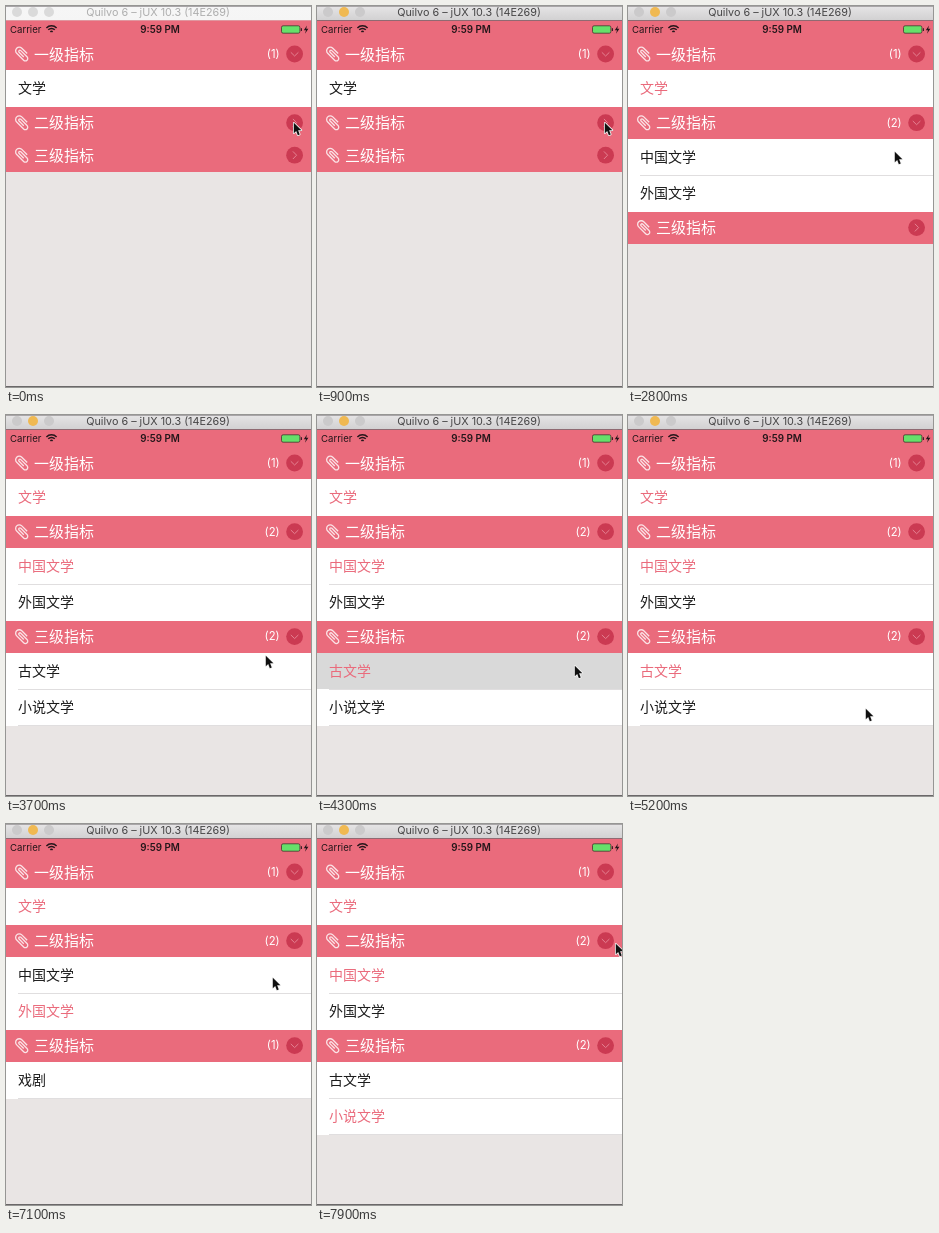
An HTML page with a canvas that plays this animation: 305x381 px, repeating every 8 s.

```html
<!DOCTYPE html>
<html lang="zh">
<head>
<meta charset="utf-8">
<style>
  html, body { margin: 0; width: 100%; height: 100%; overflow: hidden; background: #e9e5e4; }
  canvas { display: block; width: 305px; height: 381px; }
</style>
</head>
<body>
<canvas id="stage"></canvas>
<script>
const W = 305, H = 381, LOOP = 8000, STEP = 100;
const PINK = '#ea6b7c', DARK = '#cb3a52', GREY = '#e9e5e4', INK = '#24161a';
const LATIN = 'Inter, "Liberation Sans", sans-serif';
const HAN = '"Noto Sans CJK SC", "Noto Sans CJK", sans-serif';
const TOP = 32, HEAD_H = 32.5, ROW_H = 36.2;
const CLICK_DELAY = 200, PRESS_FADE = 300;

const canvas = document.getElementById('stage');
const ctx = canvas.getContext('2d');
const dpr = window.devicePixelRatio || 1;
canvas.width = W * dpr;
canvas.height = H * dpr;

const node = (name, ...kids) => ({ name, kids });
const titles = ['一级指标', '二级指标', '三级指标'];
const root = node('',
  node('文学',
    node('中国文学', node('古文学'), node('小说文学')),
    node('外国文学', node('戏剧'))));

// Pointer arrivals; a stop with a level clicks that row shortly after.
const stop = (at, x, y, level, index) => ({ at, x, y, level, index });
const stops = [
  stop(0, 287, 116),
  stop(1200, 283, 137),
  stop(2000, 282, 73, 0, 0),
  stop(2800, 266, 145, 1, 0),
  stop(3700, 259, 240),
  stop(4100, 257, 250, 2, 0),
  stop(5200, 237, 293, 2, 1),
  stop(6100, 253, 178, 1, 1),
  stop(7100, 266, 153, 1, 0),
  stop(7900, 298, 119)
];

function rect(x, y, w, h, color) {
  ctx.fillStyle = color;
  ctx.fillRect(x, y, w, h);
}

function disc(x, y, r, color) {
  ctx.fillStyle = color;
  ctx.beginPath();
  ctx.arc(x, y, r, 0, 7);
  ctx.fill();
}

function text(s, x, y, font, color, align = 'left') {
  ctx.font = font;
  ctx.fillStyle = color;
  ctx.textAlign = align;
  ctx.fillText(s, x, y);
}

function stroke(color, width) {
  ctx.strokeStyle = color;
  ctx.lineWidth = width;
  ctx.stroke();
}

function fill(color) {
  ctx.fillStyle = color;
  ctx.fill();
}

function poly(...points) {
  ctx.beginPath();
  points.forEach(([x, y]) => ctx.lineTo(x, y));
}

function titleBar(active) {
  const g = ctx.createLinearGradient(0, 0, 0, 14);
  g.addColorStop(0, active ? '#e6e5e6' : '#f6f6f6');
  g.addColorStop(1, active ? '#d2d1d2' : '#f5f5f5');
  rect(0, 0, W, 14, g);
  rect(0, 0, W, 1, '#a9a6a8');
  rect(0, 14, W, 1, active ? '#8f6a72' : '#e0969f');
  for (let i = 0; i < 3; i++) {
    const lit = active && i === 1;
    disc(11 + 16 * i, 6, 5, lit ? '#f0b952' : active ? '#cbcacb' : '#dadada');
  }
  text('Quilvo 6 – jUX 10.3 (14E269)', 152, 10, '10.8px ' + LATIN,
    active ? '#454445' : '#adadad', 'center');
}

function statusBar() {
  text('Carrier', 4, 27, '9.6px ' + LATIN, INK);
  text('9:59 PM', 154, 27, '600 9.8px ' + LATIN, INK, 'center');

  const wave = r => {
    ctx.beginPath();
    ctx.arc(45.5, 27, r, -Math.PI * 0.75, -Math.PI * 0.25);
  };
  [7.2, 4.6, 1.6].forEach(r => { wave(r); stroke(INK, 1.5); });

  ctx.beginPath();
  ctx.roundRect(275.5, 19.8, 18.4, 7.4, 1.6);
  fill('#66e06a');
  stroke('#3b2226', 0.7);
  rect(294.8, 22.2, 1.2, 2.8, '#3b2226');
  poly([301, 19.6], [297.8, 24.2], [300, 24.2], [299, 27.8], [302.4, 22.8], [300.2, 22.8]);
  fill(INK);
}

function paperclip(x, y) {
  const q = Math.PI / 2;
  ctx.save();
  ctx.translate(x, y);
  ctx.rotate(q / 2);
  ctx.beginPath();
  ctx.moveTo(3, -3.6);
  ctx.lineTo(-4.6, -3.6);
  ctx.arc(-4.6, 0, 3.6, -q, q, true);
  ctx.lineTo(5.2, 3.6);
  ctx.arc(5.2, 1.2, 2.4, q, -q, true);
  ctx.lineTo(-3.6, -1.2);
  ctx.arc(-3.6, 0, 1.2, -q, q, true);
  ctx.lineTo(3, 1.2);
  stroke('#fbe3e6', 1.3);
  ctx.restore();
}

function header(y, title, count) {
  const mid = y + 16, top = Math.round(y);
  rect(0, top, W, Math.round(y + HEAD_H) - top, PINK);
  paperclip(16.5, mid);
  text(title, 28, mid + 5.5, '15px ' + HAN, '#fff');
  disc(288.6, mid, 8.4, DARK);
  ctx.save();
  ctx.translate(288.6, mid);
  if (count) ctx.rotate(Math.PI / 2);
  poly([-1.7, -3.8], [2, 0], [-1.7, 3.8]);
  stroke('#e58292', 1);
  ctx.restore();
  if (count) text(`(${count})`, 273.7, mid + 3.8, '11.3px ' + LATIN, '#fff', 'right');
}

function divider(y) {
  rect(12, Math.floor(y), W - 12, 1, '#e0dedf');
}

function row(y, label, chosen, press) {
  const top = Math.floor(y);
  rect(0, top, W, Math.floor(y + ROW_H) + 1 - top, '#fff');
  if (press > 0) rect(0, top, W, ROW_H, `rgba(217,217,217,${press})`);
  text(label, 12, y + 22.7, '14px ' + HAN, chosen ? PINK : '#1c1c1c');
}

// Replays the clicks; every parent remembers its chosen child.
function replay(t) {
  const chosen = new Map();
  let last = null, since = 0;
  for (const s of stops) {
    if (s.level === undefined || s.at + CLICK_DELAY > t) continue;
    let parent = root;
    for (let i = 0; i < s.level; i++) parent = parent.kids[chosen.get(parent)];
    chosen.set(parent, s.index);
    last = parent.kids[s.index];
    since = t - s.at - CLICK_DELAY;
  }
  return { chosen, last, since };
}

function list(t) {
  const { chosen, last, since } = replay(t);
  let parent = root, y = TOP;
  titles.forEach((title, level) => {
    const kids = parent ? parent.kids : [];
    header(y, title, kids.length);
    y += HEAD_H;
    const pick = chosen.get(parent);
    kids.forEach((kid, i) => {
      const pressed = kid === last && !kid.kids.length;
      row(y, kid.name, i === pick, pressed ? 1 - since / PRESS_FADE : 0);
      if (i) divider(y);
      y += ROW_H;
    });
    if (kids.length && level === titles.length - 1) divider(y);
    parent = kids[pick];
  });
}

function pointerAt(t) {
  const i = stops.findIndex(s => s.at > t);
  if (i < 0) return stops[stops.length - 1];
  const a = stops[i - 1], b = stops[i];
  const dx = b.x - a.x, dy = b.y - a.y;
  const travel = 150 + 5 * Math.hypot(dx, dy);
  const left = Math.min(1, (b.at - t) / travel);
  const e = 1 - left ** 3;
  return { x: a.x + dx * e, y: a.y + dy * e };
}

function arrow({ x, y }) {
  ctx.save();
  ctx.translate(x + 0.8, y + 0.8);
  ctx.scale(0.9, 0.9);
  poly([0, 0], [0, 11.6], [2.7, 9.2], [4.5, 13.8], [6.6, 12.9], [4.8, 8.4], [8.4, 8.2]);
  ctx.closePath();
  ctx.lineJoin = 'round';
  stroke('#f4f4f4', 1.8);
  fill('#101010');
  ctx.restore();
}

function draw(now) {
  const t = Math.floor((now % LOOP) / STEP) * STEP;
  ctx.setTransform(dpr, 0, 0, dpr, 0, 0);
  rect(0, 0, W, H, GREY);
  rect(0, 14, W, TOP - 14, PINK);
  titleBar(t >= 100);
  statusBar();
  list(t);
  rect(0, 380, W, 1, '#6b6869');
  arrow(pointerAt(t));
}

const start = performance.now();
function tick() {
  draw(performance.now() - start);
  requestAnimationFrame(tick);
}
tick();
</script>
</body>
</html>
```
